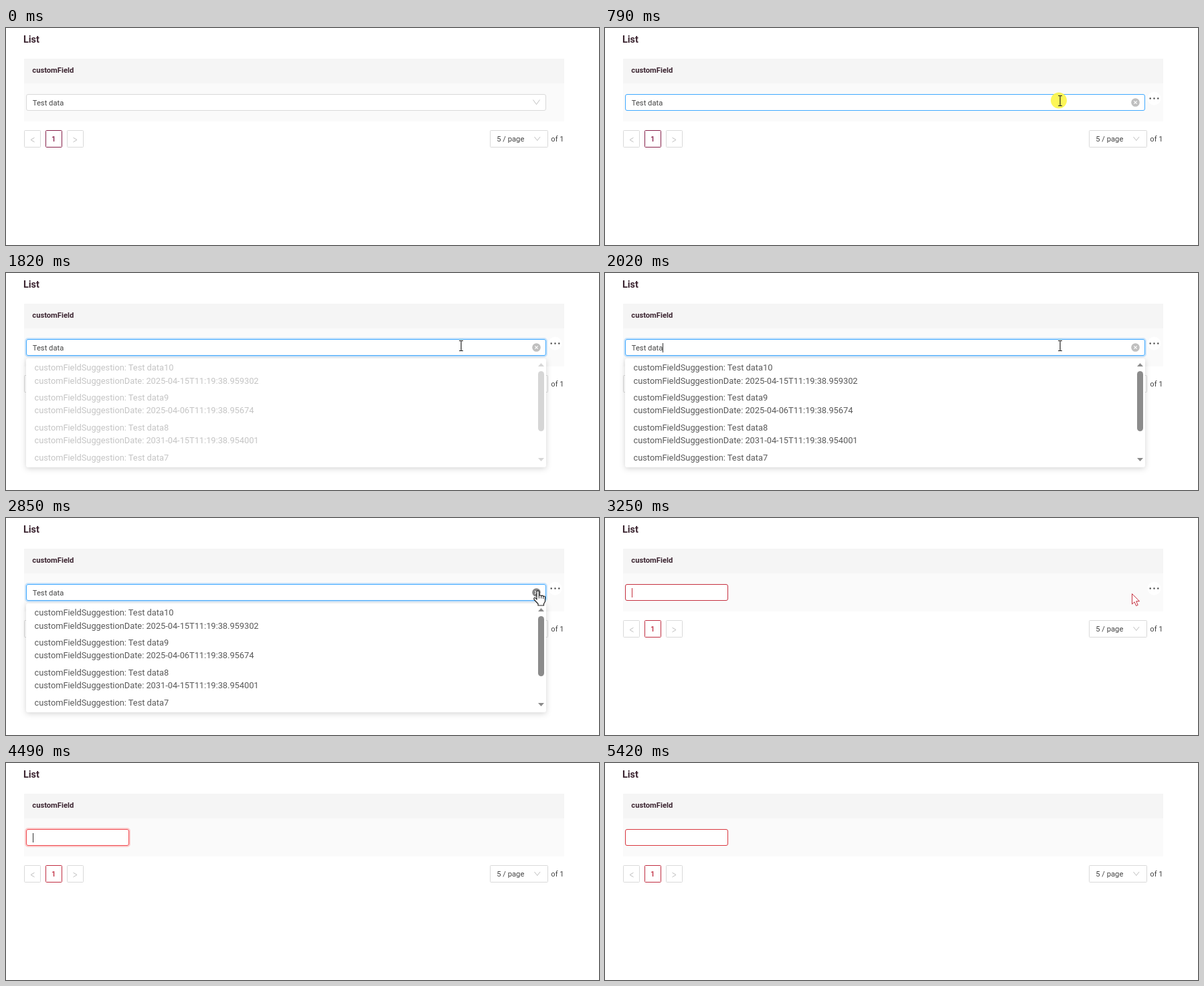
An HTML page for the animation above (5.49 s loop, 886 by 325 pixels).

```html
<!DOCTYPE html>
<html lang="en">
<head>
<meta charset="utf-8">
<title>List</title>
<style>
html, body { margin: 0; width: 100%; height: 100%; overflow: hidden; background: #fff; }
svg { display: block; width: 886px; height: 325px; }
text { font: 11.2px Roboto, Arial, sans-serif; fill: #444; }
.bold { font-weight: 700; fill: #3b2430; }
.title { font-size: 14.4px; }
.box { fill: #fff; stroke: #d9d9d9; }
.line { fill: none; stroke: #bfbfbf; }

/* Every animation shares the 5490 ms loop; stepped ones switch at once. */
[class*="a-"] { animation: 5490ms linear infinite; }
.step { animation-timing-function: step-end; }

/* Table */
.a-page { animation-name: page; color: #861f49; }
@keyframes page { 0% { color: #861f49; } 58% { color: #c02c40; } 100% { color: #c02c40; } }
.a-dots { animation-name: dots; opacity: 0; }
@keyframes dots { 0% { opacity: 0; } 7.9% { opacity: 1; } 67.3% { opacity: 0; } }

/* Filled field */
.a-wide { animation-name: wide; }
@keyframes wide { 0% { opacity: 1; } 58% { opacity: 0; } 100% { opacity: 0; } }
.a-border { animation-name: border; }
@keyframes border { 0%, 11.8% { stroke: #d9d9d9; } 14.2%, 100% { stroke: #40a9ff; } }
.glow { fill: none; stroke-width: 2; opacity: 0; }
.a-focus { animation-name: focus; stroke: #1890ff; }
@keyframes focus { 0%, 15.6% { opacity: 0; } 19.5%, 100% { opacity: .2; } }
.a-arrow { animation-name: arrow; }
@keyframes arrow { 0%, 11.8% { opacity: 1; } 14.2%, 100% { opacity: 0; } }
.a-clear { animation-name: clear; }
@keyframes clear { 0%, 11.8% { opacity: 0; } 14.2%, 100% { opacity: 1; } }
.a-disc { animation-name: disc; }
@keyframes disc {
  0%, 44.5% { fill: #bfbfbf; } 45.5%, 46% { fill: #858585; }
  47%, 49% { fill: #bfbfbf; } 50.5%, 100% { fill: #858585; }
}
.a-caret { animation-name: caret; opacity: 0; }
@keyframes caret { 0% { opacity: 0; } 17.2% { opacity: 1; } 25.2% { opacity: 0; } 36.2% { opacity: 1; } 45.8% { opacity: 0; } }

/* Empty field */
.a-short { animation-name: short; opacity: 0; }
@keyframes short { 0% { opacity: 0; } 58% { opacity: 1; } 100% { opacity: 1; } }
.a-red { animation-name: red; }
@keyframes red {
  0%, 59.5% { stroke: #c5303f; } 65%, 98.3% { stroke: #f0484e; } 98.5%, 100% { stroke: #d9363e; }
}
.a-warn { animation-name: warn; stroke: #ff4d4f; }
@keyframes warn { 0%, 59.5% { opacity: 0; } 65%, 98.3% { opacity: .25; } 98.5%, 100% { opacity: 0; } }
.a-blink { animation-name: blink; }
@keyframes blink {
  0% { opacity: 1; stroke: #c5303f; } 68.5% { opacity: 0; } 78.3% { opacity: 1; stroke: #333; }
  88.2% { opacity: 0; stroke: #333; } 97.7% { opacity: 1; stroke: #333; } 98.4% { opacity: 0; }
}

/* Dropdown */
.a-panel { animation-name: panel; transform-origin: 0 128px; opacity: 0; }
@keyframes panel {
  0%, 15.7% { opacity: 0; transform: scaleY(.8); animation-timing-function: ease-out; }
  19.3%, 56.8% { opacity: 1; transform: none; }
  59%, 100% { opacity: 0; transform: scaleY(.8); }
}
.sheet { fill: #fff; filter: drop-shadow(0 2px 4px rgba(0, 0, 0, .17)); }
.a-sheet { animation-name: sheet; height: 109px; }
@keyframes sheet { 0%, 27.2% { height: 109px; } 30%, 100% { height: 163px; } }
.a-empty { animation-name: empty; }
@keyframes empty { 0%, 25.4% { opacity: 1; } 28.4%, 100% { opacity: 0; } }
.empty text { fill: #bfbfbf; text-anchor: middle; }
.a-list { animation-name: list; opacity: 0; }
@keyframes list { 0%, 31.2% { opacity: 0; } 36.8%, 100% { opacity: 1; } }
.list text { font-size: 12.8px; fill: #595959; }

/* Pointer */
.a-move { animation-name: move; }
@keyframes move {
  0%, 1.09% { transform: translate(790px, 298px); }
  4.6% { transform: translate(742px, 200px); }
  7.3% { transform: translate(712px, 152px); }
  10.6% { transform: translate(693px, 124px); }
  12.8%, 41.5% { transform: translate(680px, 109px); animation-timing-function: ease-in; }
  45.5% { transform: translate(798px, 112px); }
  47% { transform: translate(815px, 109px); }
  51%, 57.2% { transform: translate(795px, 109px); }
  58.8%, 65.8% { transform: translate(787px, 113px); }
  68.6%, 73% { transform: translate(803px, 168px); animation-timing-function: ease-in; }
  81.6%, 100% { transform: translate(838px, 328px); }
}
.a-point { animation-name: point; stroke: #222; }
@keyframes point {
  0% { opacity: 0; } 1.08% { opacity: 1; stroke: #222; } 10.8% { opacity: 0; }
  58% { opacity: 1; stroke: #c5303f; } 81.7% { opacity: 0; stroke: #c5303f; }
}
.a-beam { animation-name: beam; opacity: 0; }
@keyframes beam { 0% { opacity: 0; } 10.8% { opacity: 1; } 44.5% { opacity: 0; } }
.a-hand { animation-name: hand; opacity: 0; }
@keyframes hand { 0% { opacity: 0; } 44.5% { opacity: 1; } 58% { opacity: 0; } }
.halo { fill: #fdf545; opacity: 0; }
.a-press { animation-name: press; }
@keyframes press { 0%, 13.2% { opacity: 0; } 13.8%, 15.8% { opacity: .9; } 17.4%, 100% { opacity: 0; } }
.a-press2 { animation-name: press2; }
@keyframes press2 { 0%, 55.2% { opacity: 0; } 55.8%, 57% { opacity: .9; } 58.6%, 100% { opacity: 0; } }
</style>
</head>
<body>
<svg viewBox="0 0 886 325">
  <text class="bold title" x="26" y="22">List</text>
  <rect x="27" y="46" width="807" height="37" fill="#f5f5f5"/>
  <rect x="27" y="83" width="807" height="57" fill="#fafafa"/>
  <text class="bold" x="39.3" y="67">customField</text>

  <g class="a-dots step">
    <circle cx="820.5" cy="105.5" r="10" fill="#fff"/>
    <path d="M814.7 105.5h0M820.5 105.5h0M826.3 105.5h0" stroke="#444" stroke-width="2.4" stroke-linecap="round"/>
  </g>

  <rect class="box" x="27.5" y="153.5" width="24" height="25" rx="1"/>
  <path class="line" d="M42.5 164.2l-5.500 3.300 5.500 3.300"/>
  <g class="a-page step">
    <rect x="59.500" y="153.500" width="24" height="25" rx="1" fill="#fff" stroke="currentColor"/>
    <text x="71.300" y="170" text-anchor="middle" style="fill: currentColor; font-weight: 500">1</text>
  </g>
  <rect class="box" x="91.500" y="153.500" width="24" height="25" rx="1"/>
  <path class="line" d="M100.500 164.200l5.500 3.300-5.500 3.300"/>
  <rect class="box" x="723.500" y="153.500" width="86" height="25" rx="1"/>
  <text x="733.300" y="170">5 / page</text>
  <path class="line" d="M789.500 163l4.300 5.500 4.300-5.500"/>
  <text x="814.300" y="170">of 1</text>

  <g class="a-wide step">
    <rect class="glow a-focus" x="29" y="98" width="779" height="27" rx="4"/>
    <rect class="box a-border" x="30.500" y="99.500" width="776" height="24" rx="2.500"/>
    <text x="39.800" y="116">Test data</text>
    <path class="a-caret step" d="M86.500 105v14" stroke="#333"/>
    <path class="line a-arrow" d="M787.500 107.500l5 7 5-7"/>
    <g class="a-clear">
      <circle class="a-disc" cx="792.500" cy="111.500" r="6.300" fill="#bfbfbf"/>
      <path d="M790.300 109.300l4.400 4.400m0-4.400l-4.400 4.400" stroke="#fff" stroke-width="1.100"/>
    </g>
  </g>

  <g class="a-short step">
    <rect class="glow a-warn" x="29" y="98" width="156" height="27" rx="4"/>
    <rect class="box a-red" x="30.500" y="99.500" width="153" height="24" rx="2.500"/>
    <path class="a-blink step" d="M40.500 105v14" stroke="#333"/>
  </g>

  <g class="a-panel">
    <rect class="sheet a-sheet" x="30" y="128" width="777" rx="3"/>
    <g class="empty a-empty">
      <ellipse cx="418.500" cy="186" rx="21" ry="5" fill="#f5f5f5"/>
      <path d="M403 170l7-9h17l7 9v16h-31zM403 170h9q1 5 6.500 5t6.500-5h9" fill="#fafafa" stroke="#d9d9d9"/>
      <text x="418.500" y="207">No data</text>
    </g>
    <g class="list a-list">
      <text x="42.500" y="146">customFieldSuggestion: Test data10</text>
      <text x="42.500" y="165.500">customFieldSuggestionDate: 2025-04-15T11:19:38.959302</text>
      <text x="42.500" y="191">customFieldSuggestion: Test data9</text>
      <text x="42.500" y="210">customFieldSuggestionDate: 2025-04-06T11:19:38.95674</text>
      <text x="42.500" y="236">customFieldSuggestion: Test data8</text>
      <text x="42.500" y="255">customFieldSuggestionDate: 2031-04-15T11:19:38.954001</text>
      <text x="42.500" y="281">customFieldSuggestion: Test data7</text>
      <rect x="795" y="147" width="9" height="90" rx="4.500" fill="#8b8b8b"/>
      <path d="M795 140h9l-4.500-5zM795 277h9l-4.500 5z" fill="#8b8b8b"/>
    </g>
  </g>

  <circle class="halo a-press" cx="678" cy="108.500" r="12"/>
  <circle class="halo a-press2" cx="796" cy="108.500" r="12"/>
  <g class="a-move">
    <path class="a-point step" d="M.5.5v15.500l3.600-3.300 2.500 5.800 2.600-1.100-2.500-5.700h4.800z" fill="#fff"/>
    <path class="a-beam step" d="M-3-7.500h2.500l.5.500.5-.500h2.500M0-7v14M-3 7.500h2.500l.5-.500.5.500h2.500" fill="none" stroke="#222" stroke-width="1.200"/>
    <g class="a-hand step">
      <path d="M-2 13V1.500a1.700 1.700 0 0 1 3.400 0V8a1.600 1.600 0 0 1 3.200.3 1.600 1.600 0 0 1 3.100.8 1.500 1.500 0 0 1 2.800 1.200V16l-2 3.500V22H0v-2.500L-5.700 13.500q-1.300-2.500.5-3.200 1.400-.2 3.200 2.700z"
        fill="#fff" stroke="#222" stroke-width="1.200" stroke-linejoin="round"/>
      <path d="M1.400 8v3.500M4.600 8.500v3M7.700 9.500v2.500" stroke="#222"/>
    </g>
  </g>
</svg>
</body>
</html>
```
